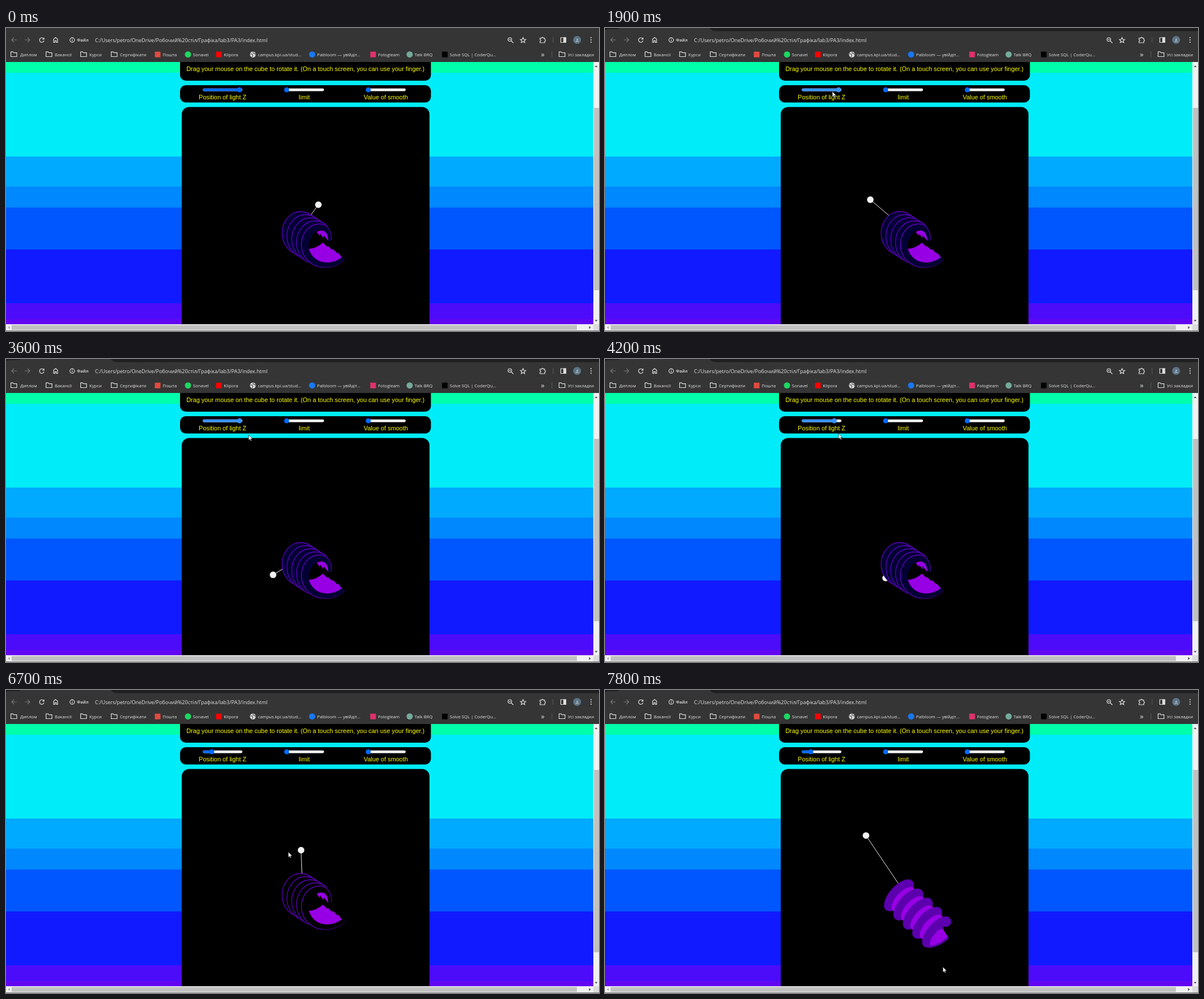
Write an HTML page that moves like this. It is 1046 px wide and 535 px high and loops after 8 s.

```html
<!DOCTYPE html>
<html lang="uk">
<head>
<meta charset="utf-8">
<title>Spiral surface</title>
<style>
html, body { margin: 0; width: 100%; height: 100%; overflow: hidden; background: #353535; }
svg { display: block; }
.ui { font-family: "Open Sans", "Noto Sans", sans-serif; fill: #e3e3e3; }
.mark { font-size: 7.7px; }
.page { font: 10.93px "Liberation Sans", Arial, sans-serif; fill: #ff0; text-anchor: middle; }
.icon { fill: none; stroke: #dedede; stroke-width: 1.2; }
</style>
</head>
<body>
<svg width="1046" height="535" viewBox="0 0 1046 535">
  <defs>
    <linearGradient id="rim" gradientUnits="userSpaceOnUse" x1="530" y1="372" x2="597" y2="408">
      <stop offset="0" stop-color="#6000c0"/>
      <stop offset=".45" stop-color="#4a0098"/>
      <stop offset="1" stop-color="#1a0038"/>
    </linearGradient>
    <clipPath id="view"><rect y="60" width="1036" height="463"/></clipPath>
  </defs>
  <rect width="1046" height="535" fill="#353535"/>
  <g id="tabs" fill="#1f1f1f">
    <path d="M0 0H26Q24 2 19 2H6Q3 2 0 4Z"/>
    <path d="M185 0H1046V5.5H196Q188 5.5 185 0Z"/>
  </g>

  <g class="icon">
    <g stroke="#777"><path d="M19 21H10M14 17L10 21L14 25"/><path d="M33 21H42M38 17L42 21L38 25"/></g>
    <path d="M66.5 19A4 4 0 1 0 67 22.5M67 17V20H64"/>
    <path d="M84 25.5V19.5L87.5 16.7L91 19.5V25.5H88.7V22.3H86.3V25.5Z"/>
    <circle cx="116.8" cy="21.2" r="4"/><path d="M116.8 20.5V23.6M116.8 18.6V19.6"/>
    <circle cx="888.7" cy="20.2" r="3.2"/><path d="M891 22.5L895 26.5M887 20.2H890.4"/>
    <path d="M912 16.8L913.4 20L916.8 20.3L914.2 22.5L915 25.8L912 24L909 25.8L909.8 22.5L907.2 20.3L910.6 20Z"/>
    <path d="M942 17.8H945A1.4 1.4 0 0 1 947.8 17.8H950.3V20.5A1.4 1.4 0 0 1 950.3 23.3V26H942V23.3A1.4 1.4 0 0 0 942 20.5Z"/>
    <path d="M978.5 17H987.5V25.5H978.5Z"/><path d="M983.7 17H987.5V25.5H983.7Z" fill="#dedede"/>
    <path d="M965 16V26M963 41V52" stroke="#555"/>
  </g>
  <circle cx="1007.4" cy="21" r="7" fill="#5b7486"/>
  <g fill="#dedede"><circle cx="1032" cy="17" r="1.1"/><circle cx="1032" cy="21" r="1.1"/><circle cx="1032" cy="25" r="1.1"/></g>
  <g class="ui">
    <text x="125" y="24.3" font-size="7.7" font-weight="600">Файл</text>
    <text x="157" y="24.8" font-size="9">C:/Users/petro/OneDrive/Робочий%20стіл/Графіка/lab3/PA3/index.html</text>
    <text x="1007.4" y="23.6" font-size="7" text-anchor="middle">Д</text>
    <text x="943.5" y="51" font-size="13">»</text>
  </g>
  <g id="marks"></g>

  <g clip-path="url(#view)">
    <g id="bands"></g>
    <rect x="307" y="30" width="442.500" height="63" rx="10"/>
    <rect x="307" y="101" width="442.500" height="30.500" rx="10"/>
    <rect x="310" y="139.500" width="437" height="420" rx="13"/>
    <g class="page">
      <text x="528.2" y="76.300">Drag your mouse on the cube to rotate it. (On a touch screen, you can use your finger.)</text>
      <text x="382" y="126">Position of light Z</text>
      <text x="526" y="126">limit</text>
      <text x="670" y="126">Value of smooth</text>
    </g>
    <g id="sliders"></g>
    <line id="ray" stroke="#eee" x2="523" y2="350"/>
    <circle id="lamp" r="5.800" fill="#f2f2f2"/>
    <g id="rings"></g>
    <g id="capA">
      <path id="band" d="M574 375C575 356 565 346 553 346C535 346 521 362 521 383C521 406 540 423 563 423C577 423 590 417 598 409L592 404C575 418 540 412 534 390C533 375 541 361 551 357C560 355 568 364 569 377Z"/>
      <path d="M574 375C575 356 565 346 553 346C535 346 521 362 521 383C521 406 540 423 563 423C577 423 590 417 598 409" fill="none" stroke="url(#rim)" stroke-width="1.400"/>
      <path fill="#9700e4" d="M548 360Q555 356 561 358.500Q568 362 568.500 376L560.500 366L560 371L554 363L553.500 367Z"/>
      <path fill="#9700e4" d="M534 390Q548 389 559 379L566.500 386L568 385L575 391.500L577 390.500L584 397.500L586 397L592.500 405Q580 414 566 414Q542 413 534 390Z"/>
    </g>
    <g id="capB">
      <path d="M614 409L607 416Q602 420 598 417L595 421L601 430L606 437L616 436Z"/>
      <path fill="#9700e4" d="M573 451Q572 440 583 429Q590 421 596 421L601 430Q606 435 605 438Q592 451 573 451Z"/>
      <path fill="none" stroke="#5c00ae" stroke-width="3.500" stroke-linecap="round" d="M604.500 437.500Q592 450 573 453.500"/>
    </g>
  </g>

  <rect x="1036" y="60" width="10" height="463" fill="#f1f1f1"/>
  <rect x="1037" y="141" width="9" height="322" fill="#c1c1c1"/>
  <rect y="523" width="1036" height="12" fill="#f1f1f1"/>
  <rect x="10" y="524.500" width="997" height="8.500" fill="#c1c1c1"/>
  <rect x="1036" y="523" width="10" height="12" fill="#dcdcdc"/>
  <rect y="534" width="1046" height="1" fill="#777"/>
  <g fill="#505050">
    <path d="M1038.500 69L1041 66L1043.500 69Z"/>
    <path d="M1038.500 515.500L1041 518.500L1043.500 515.500Z"/>
    <path d="M1028.500 526L1031.500 528.700L1028.500 531.500Z"/>
    <path fill="#a8a8a8" d="M6.500 526L3.500 528.700L6.500 531.500Z"/>
  </g>
  <path id="cursor" d="M0 0V9.500L2.200 7.500L3.700 10.800L5.200 10.100L3.700 6.900H6.700Z" fill="#fff" stroke="#222" stroke-width=".7"/>
</svg>
<script>
const $ = id => document.getElementById(id);
const add = (parent, tag, attrs, text) => {
  const el = document.createElementNS("http://www.w3.org/2000/svg", tag);
  set(el, attrs);
  if (text) el.textContent = text;
  return parent.appendChild(el);
};
function set(el, attrs) {
  for (const k in attrs) el.setAttribute(k, attrs[k]);
}
const lerp = (a, b, p) => a + (b - a) * p;
const clamp = v => Math.max(0, Math.min(1, v));
const mix = (a, b, p) => a.map((v, i) => lerp(v, b[i], p));
const rgb = c => `rgb(${c.map(Math.round)})`;

// Bookmarks: x, icon kind, icon colour, label
const folder = "M.6 1.200H4.300L5.600 2.600H11V9.500H.6Z";
[
  [8, "folder", "", "Диплом"], [70, "folder", "", "Вакансії"],
  [131, "folder", "", "Курси"], [185, "folder", "", "Сертифікати"],
  [262, "square", "#e04a3f", "Пошта"], [315.500, "circle", "#1ed760", "Sonavel"],
  [370, "square", "#f00", "Klipora"], [430, "globe", "", "campus.kpi.ua/stud..."],
  [534.500, "circle", "#1877f2", "Palbloom — увійдіт..."], [642, "square", "#e1306c", "Fotogleam"],
  [706.500, "circle", "#74aa9c", "Talk BRQ"], [768.500, "square", "#000", "Solve SQL | CoderQu..."],
  [975, "folder", "", "Усі закладки"]
].forEach(([x, kind, fill, label]) => {
  const g = add($("marks"), "g", { transform: `translate(${x} 41)` });
  if (kind === "folder") add(g, "path", { d: folder, class: "icon" });
  if (kind === "square") add(g, "rect", { x: .5, y: .7, width: 10, height: 10, rx: 1, fill });
  if (kind === "circle") add(g, "circle", { cx: 5.500, cy: 5.700, r: 5.500, fill });
  if (kind === "globe") {
    add(g, "circle", { cx: 5.500, cy: 5.700, r: 5.200, fill: "#dadada" });
    add(g, "path", { d: "M1 5Q4 4 5 6T4 10M6 1Q5 4 8 4T10 7", fill: "none", stroke: "#555", "stroke-width": 1.300 });
  }
  const dx = kind === "folder" ? (x === 8 ? 17 : 16) : 14.300;
  add(g, "text", { x: dx, y: 8.500, class: "ui mark" }, label);
});

[
  [60, "#00ffaa"], [79, "#00ecf8"], [227, "#00aaff"], [280, "#0088ff"],
  [317, "#0057ff"], [391, "#111aff"], [486, "#4c0cfa"], [514, "#6207f2"]
].forEach(([y, fill]) => add($("bands"), "rect", { y, width: 1036, height: 535 - y, fill }));

const sliders = [347, 491, 635].map(x => {
  const bar = { x, y: 106.800, height: 4.600, rx: 2.300 };
  add($("sliders"), "rect", { ...bar, width: 70, fill: "#fafafa" });
  return {
    x,
    fill: add($("sliders"), "rect", bar),
    knob: add($("sliders"), "circle", { cy: 109.200, r: 4.400 })
  };
});
function setSlider({ x, fill, knob }, pos, color) {
  set(fill, { width: pos - x, fill: color });
  set(knob, { cx: pos, fill: color });
}
const BLUE = "#0069ff", ACTIVE = "#3793ff";
setSlider(sliders[1], 495, BLUE);
setSlider(sliders[2], 639, BLUE);

const rings = [0, 1, 2, 3, 4].map(() => ({
  face: add($("rings"), "ellipse", { "stroke-width": 1.300 }),
  glow: add($("rings"), "ellipse", { fill: "#9700e4" })
}));

// Keys are [time, ...values]
function track(keys, t) {
  let i = 0;
  while (i < keys.length - 2 && t >= keys[i + 1][0]) i++;
  const a = keys[i], b = keys[i + 1];
  return mix(a.slice(1), b.slice(1), clamp((t - a[0]) / (b[0] - a[0])));
}
const mouse = [
  [200, 577, 466], [500, 500, 300], [900, 414, 132], [1100, 408, 126], [1300, 408, 126],
  [1900, 401, 112], [2100, 394, 113], [2600, 304, 117], [2800, 306, 118], [3300, 398, 130],
  [3600, 428, 134], [4050, 428, 134], [4500, 380, 127], [5100, 375, 125], [5500, 363, 126],
  [5900, 366, 130], [6700, 498, 286], [6900, 498, 286], [7700, 596, 489]
];
const knob = [
  [2000, 412], [2100, 405], [2500, 351], [2850, 351], [3300, 398], [3450, 412],
  [4100, 412], [4550, 378], [5100, 375], [5500, 363]
];
const NAVY = [3, 0, 52], BLACK = [0, 0, 0], EDGE = [92, 0, 184], PURPLE = [92, 0, 174];

function drawSpiral(lit, p) {
  const dark = mix(BLACK, NAVY, lit);
  const major = lerp(38, 34, p), minor = lerp(33, 16, p), turn = lerp(-90, -48, p);
  const x0 = lerp(520, 518.500, p), y0 = lerp(362, 362.500, p);
  const dx = lerp(8.500, 16.600, p), dy = lerp(5.500, 16.200, p);
  const at = i => `translate(${x0 + dx * i} ${y0 + dy * i}) rotate(${turn})`;
  rings.forEach(({ face, glow }, i) => {
    const last = i === 4;
    set(face, {
      rx: major, ry: minor, transform: at(i),
      fill: rgb(mix(last ? BLACK : dark, PURPLE, p)),
      stroke: last ? "none" : rgb(mix(EDGE, PURPLE, p))
    });
    set(glow, { rx: major * .8, ry: minor * .8, transform: at(i + .45), opacity: last ? 0 : p });
  });
  $("band").setAttribute("fill", rgb(mix(dark, PURPLE, p)));
  set($("capA"), {
    transform: `${at(4)} scale(${major / 38} ${minor / 33}) rotate(90) translate(-554 -384)`,
    opacity: clamp(1.400 - p * 2)
  });
  set($("capB"), {
    transform: `${at(4)} scale(${major / 34} ${minor / 16}) rotate(48) translate(-585 -427)`,
    opacity: clamp(p * 2 - 1)
  });
}

function draw(t) {
  const s = t / 1000, c = Math.cos(s), n = Math.sin(s);
  const [pos] = track(knob, t);
  const z = (pos - 351) / 61;
  const p = clamp((t - 6900) / 800);

  const [mx, my] = track(mouse, t);
  set($("cursor"), { transform: `translate(${mx} ${my})`, visibility: t < 200 ? "hidden" : "visible" });
  $("tabs").setAttribute("visibility", t < 1300 ? "hidden" : "visible");
  setSlider(sliders[0], pos, t >= 1700 && t < 5700 ? ACTIVE : BLUE);

  // Lamp orbits once per 2π seconds; the slider shifts the orbit in depth
  const depth = 1 - z ** 2.200;
  const lx = 503.800 + 47.200 * c - 21.700 * n - 18.200 * depth - 6.600 * p;
  const ly = 337.800 - 25.800 * c - 45.500 * n - 13.400 * depth - 21 * p;
  set($("lamp"), { cx: lx, cy: ly });
  set($("ray"), { x1: lx, y1: ly });
  drawSpiral(clamp((z - .45) / .4), p);
}

function tick(now) {
  draw(Math.floor(now % 8000 / 100) * 100);
  requestAnimationFrame(tick);
}
draw(0);
requestAnimationFrame(tick);
</script>
</body>
</html>
```
